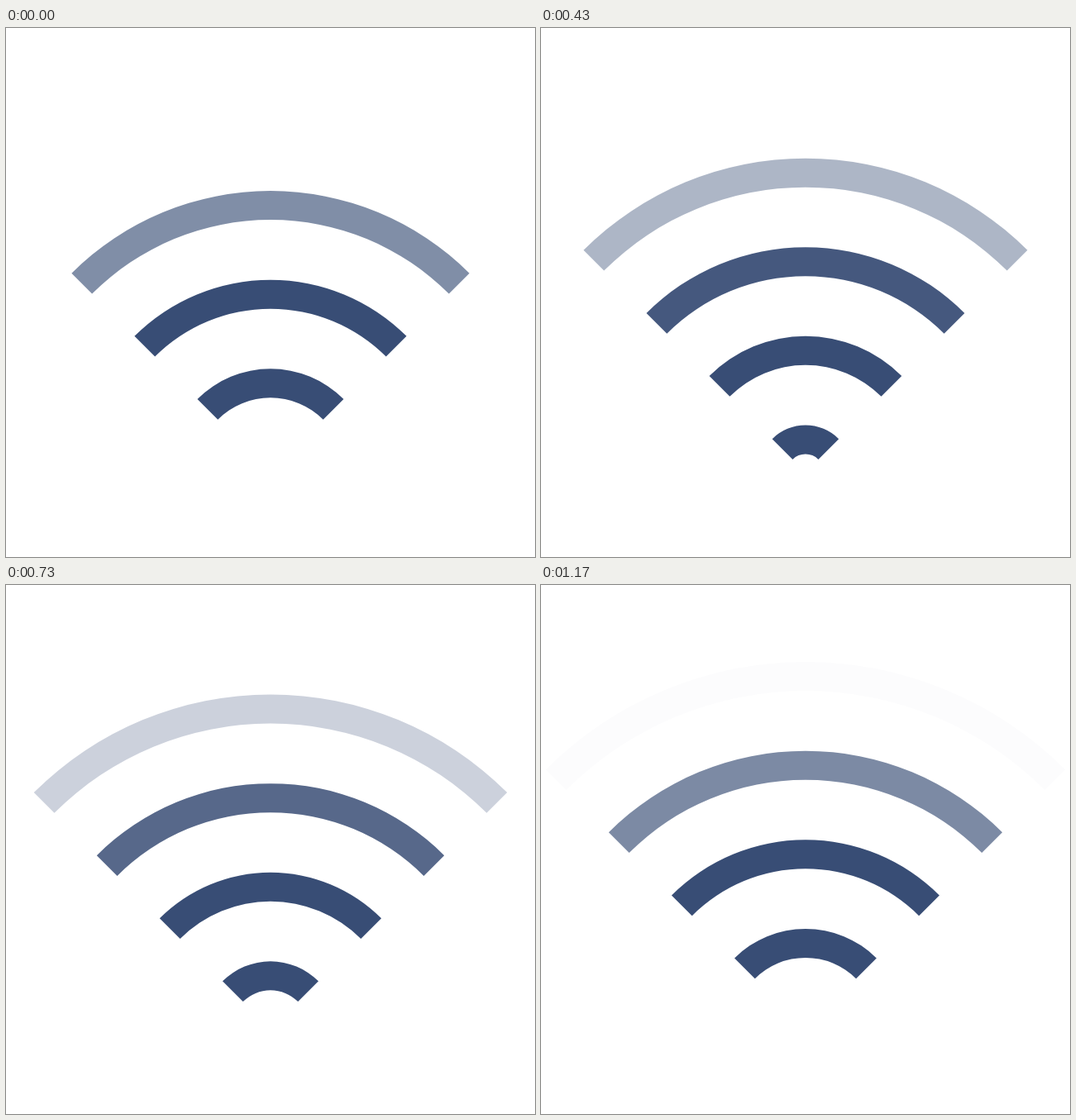
Animation of 640 by 640 pixels, one loop 1210 ms. Source, as an HTML page with a canvas:

```html
<!DOCTYPE html>
<html lang="en">
<head>
<meta charset="utf-8">
<title>Signal waves</title>
<style>
  html, body { margin: 0; width: 100%; height: 100%; overflow: hidden; background: #fff; }
  canvas { display: block; width: 640px; height: 640px; }
</style>
</head>
<body>
<canvas id="stage" width="640" height="640"></canvas>
<script>
const ctx = document.getElementById('stage').getContext('2d');

const CENTER = { x: 320, y: 537.4 };
const HALF_WIDTH = 17.5;
const STEPS = 30;            // poses per loop, also the age gap between waves
const SPEED = 107.6 / STEPS; // radius gained per pose
const FADE_START = 60;
const FADE_LENGTH = 60;

// Duration of each pose in ms, as [count, ms] runs.
const HOLDS = [
  [1, 30], [11, 40], [1, 60], [1, 40], [2, 30], [6, 40], [2, 50],
  [1, 30], [1, 40], [1, 30], [1, 60], [2, 40]
].flatMap(([count, ms]) => Array(count).fill(ms));
const LOOP = HOLDS.reduce((sum, ms) => sum + ms, 0);

function poseAt(time) {
  let pose = 0;
  while (pose < STEPS - 1 && time >= HOLDS[pose]) time -= HOLDS[pose++];
  return pose;
}

function bezier(s, a, b) {
  const r = 1 - s;
  return 3 * r * r * s * a + 3 * r * s * s * b + s * s * s;
}

// cubic-bezier(.333, 0, .833, .833)
function ease(x) {
  if (x <= 0) return 0;
  if (x >= 1) return 1;
  let low = 0, high = 1;
  for (let i = 0; i < 24; i++) {
    const mid = (low + high) / 2;
    if (bezier(mid, 1 / 3, 5 / 6) < x) low = mid;
    else high = mid;
  }
  return bezier(low, 0, 5 / 6);
}

function drawWave(age) {
  if (age === 0) return;
  const radius = age * SPEED;
  const from = -Math.PI * 3 / 4, to = -Math.PI / 4;
  ctx.globalAlpha = 1 - ease((age - FADE_START) / FADE_LENGTH);
  ctx.beginPath();
  ctx.arc(CENTER.x, CENTER.y, radius + HALF_WIDTH, from, to);
  ctx.arc(CENTER.x, CENTER.y, Math.max(0, radius - HALF_WIDTH), to, from, true);
  ctx.closePath();
  ctx.fill();
}

function render(now) {
  const pose = poseAt(now % LOOP);
  ctx.globalAlpha = 1;
  ctx.fillStyle = '#fff';
  ctx.fillRect(0, 0, 640, 640);
  ctx.fillStyle = 'rgb(56, 77, 117)';
  for (let wave = 0; wave < 4; wave++) drawWave(pose + wave * STEPS);
}

let start = null;
function tick(now) {
  if (start === null) start = now;
  render(now - start);
  requestAnimationFrame(tick);
}
render(0);
requestAnimationFrame(tick);
</script>
</body>
</html>
```
